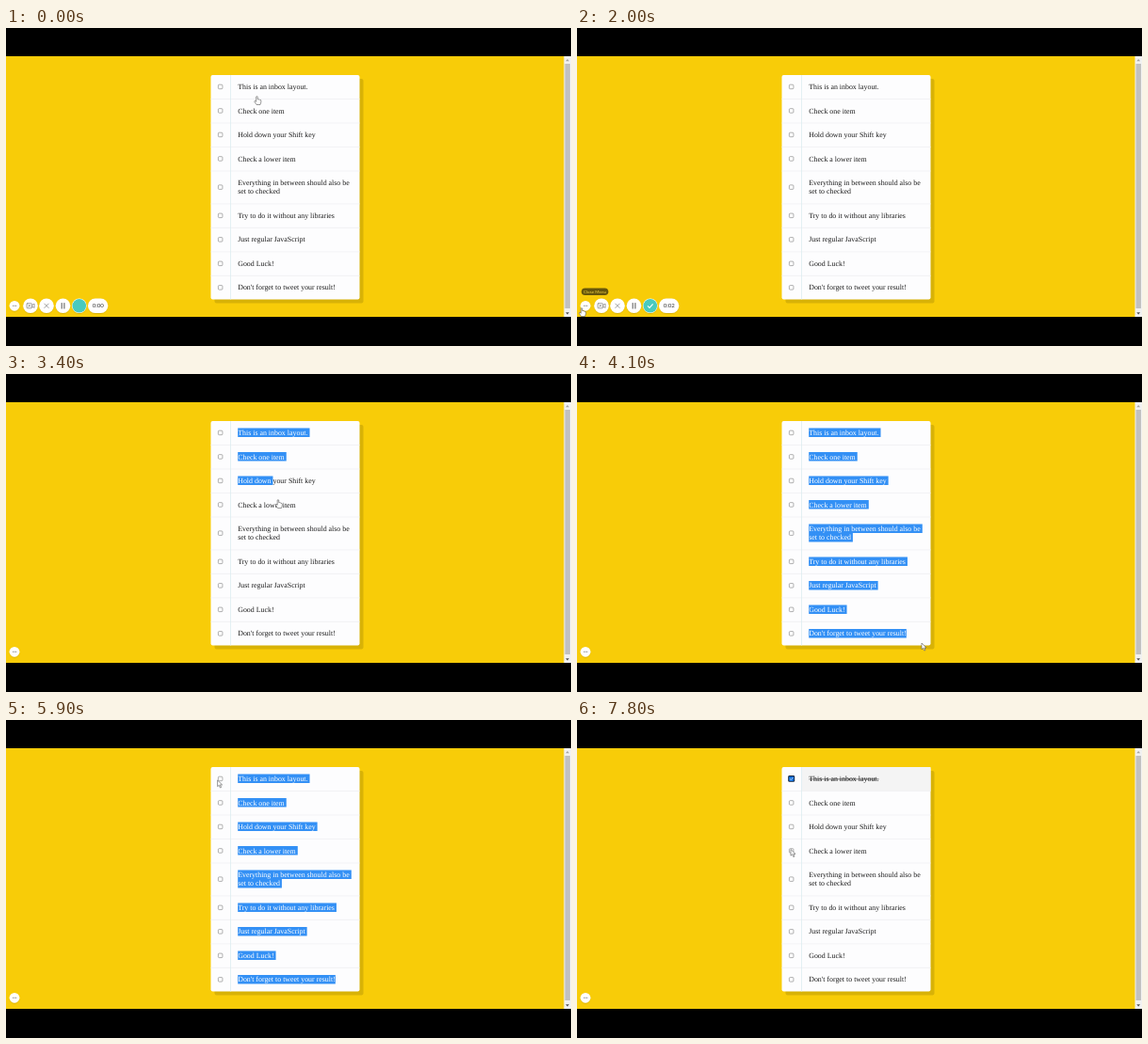
An HTML page for the animation above (8000 ms loop, 600 by 338 pixels).

```html
<!DOCTYPE html>
<html lang="en">
<head>
<meta charset="utf-8">
<title>Inbox checklist</title>
<style>
  html, body { margin: 0; width: 100%; height: 100%; overflow: hidden; background: #000; }
  svg { display: block; width: 100vw; height: 100vh; }
  .line { font: 7.9px "Liberation Serif", serif; text-rendering: geometricPrecision; white-space: pre; }
  .timer { font: 6.1px Lato, sans-serif; fill: #333; text-anchor: middle; }
  .tip { font: 4.6px Lato, sans-serif; fill: #f3d34c; text-anchor: middle; }
  .icon { fill: none; stroke: #8b8b8b; stroke-width: .8; stroke-linecap: round; stroke-linejoin: round; }
</style>
</head>
<body>
<svg id="stage" viewBox="0 0 600 338">
  <defs>
    <clipPath id="selection"></clipPath>
    <filter id="soft" x="-20%" y="-40%" width="140%" height="180%">
      <feDropShadow dx="0" dy=".5" stdDeviation=".7" flood-opacity=".25"/>
    </filter>
  </defs>
  <rect width="600" height="338"/>
  <rect y="30" width="600" height="277" fill="#f8cc08"/>

  <g id="scrollbar">
    <rect x="592.5" y="30" width="7.5" height="277" fill="#f1f1f1"/>
    <rect x="593.5" y="38" width="5.5" height="260" fill="#c1c1c1"/>
    <path d="M594.3 35.3h3.8l-1.9-2.2z" fill="#a3a3a3"/>
    <path d="M594.3 302.2h3.8l-1.9 2.2z" fill="#505050"/>
  </g>

  <rect x="221.5" y="54" width="158" height="238.5" rx="2" opacity=".13"/>
  <rect x="217.5" y="50" width="158" height="238.5" rx="2" fill="#fdfdfe"/>
  <rect id="checkedRow" x="238.8" y="50" width="136.7" height="25.2" fill="#f4f4f4"/>
  <g id="rules"></g>
  <path d="M238.5 50V288.5" stroke="#dcedf0" stroke-width=".8"/>
  <g id="boxes"></g>
  <g id="lines" fill="#1c1c1c"></g>
  <path id="strike" d="M246.3 62.9H320.5" stroke="#1c1c1c" stroke-width=".6"/>
  <g id="highlight" clip-path="url(#selection)">
    <rect x="240" y="50" width="136" height="240" fill="#3390f5"/>
    <g id="selectedLines" fill="#fff"></g>
  </g>
  <g id="tick">
    <rect id="ring" x="224.2" y="59" width="7" height="6.8" rx="1.4" fill="#10243c"/>
    <rect x="225.1" y="59.9" width="5.2" height="5" rx=".8" fill="#1270dc"/>
    <path d="M226.2 62.5l1.1 1.1 2-2.3" fill="none" stroke="#fff" stroke-width=".7"/>
  </g>

  <g id="toolbar" filter="url(#soft)">
    <g fill="#fff">
      <circle cx="26" cy="295.3" r="7.8"/>
      <circle cx="43" cy="295.3" r="7.8"/>
      <circle cx="60.5" cy="295.3" r="7.8"/>
      <circle cx="77.8" cy="295.3" r="7.8"/>
      <rect x="87" y="287.5" width="21.3" height="15.6" rx="7.8"/>
    </g>
    <circle cx="77.8" cy="295.3" r="7.3" fill="#49cabe"/>
    <g class="icon">
      <rect x="22" y="292.7" width="5.6" height="5.2" rx=".8"/>
      <path d="M27.6 294.6l2.5-1.4v4.2l-2.5-1.4M23.6 294.1l2.4 2.4m0-2.4l-2.4 2.4"/>
      <path d="M40.8 293.1l4.4 4.4m0-4.4l-4.4 4.4"/>
      <path d="M59.2 292.5v5.6m2.7-5.6v5.6" stroke="#555" stroke-width="1"/>
    </g>
    <path id="done" d="M75 295.4l2 2 3.6-4" fill="none" stroke="#fff" stroke-width="1.1"/>
    <text id="timer" class="timer" x="97.7" y="297.4"></text>
  </g>
  <g filter="url(#soft)">
    <circle cx="9" cy="295.3" r="5.4" fill="#fff"/>
    <path d="M7.1 295.3h4.2" stroke="#777" stroke-width="1.1" stroke-dasharray="1 .6"/>
  </g>
  <g id="tooltip">
    <rect x="4.7" y="276.5" width="28.6" height="7.6" rx="3.8" fill="#4d420c"/>
    <text class="tip" x="19" y="281.8">Close Menu</text>
  </g>

  <g id="cursor" fill="#fff" stroke="#555" stroke-width=".6" stroke-linejoin="round">
    <path id="arrow" d="M0 0V6.7L1.6 5.3 2.8 8 4 7.5 2.8 4.9H5z"/>
    <path id="hand" d="M-.8 .5Q0-.5 .7 .5V3.2Q1.5 2.7 2 3.5 2.8 3 3.2 3.9 4.1 3.5 4.3 4.5V6.4L3.5 9H-.5L-2.6 5.9Q-2.8 4.7-1.8 4.9L-.8 5.8z"/>
  </g>
</svg>
<script>
(() => {
  const LOOP = 8000, STEP = 100, LAG = 150;
  const LEFT = 246.2, SPACE = 2;
  const $ = id => document.getElementById(id);
  const clamp = v => Math.max(0, Math.min(1, v));
  const show = (id, on) => $(id).setAttribute('opacity', Number(on));

  function add(parent, tag, attrs, text = '') {
    const node = document.createElementNS('http://www.w3.org/2000/svg', tag);
    for (const key in attrs) node.setAttribute(key, attrs[key]);
    node.textContent = text;
    return parent.appendChild(node);
  }

  const items = [
    ['This is an inbox layout.'], ['Check one item'], ['Hold down your Shift key'],
    ['Check a lower item'], ['Everything in between should also be', 'set to checked'],
    ['Try to do it without any libraries'], ['Just regular JavaScript'],
    ['Good Luck!'], ["Don't forget to tweet your result!"]
  ];

  // Lay out rows from the top; a wrapped item is taller by one line.
  const lines = [];
  let rowTop = 50;
  items.forEach((texts, i) => {
    const height = 25.5 + (texts.length - 1) * 9.4;
    const middle = rowTop + height / 2 - .35;
    if (i) add($('rules'), 'path', { d: `M217.5 ${rowTop}H375.5`, stroke: '#f0f0f3', 'stroke-width': .8 });
    add($('boxes'), 'rect', {
      x: 225.4, y: middle - 2.2, width: 4.5, height: 4.5, rx: .9,
      fill: '#fff', stroke: '#858585', 'stroke-width': .65
    });
    texts.forEach((text, j) => {
      const center = middle + (j - (texts.length - 1) / 2) * 9.4;
      const attrs = { class: 'line', x: LEFT, y: center + 2.6 };
      const node = add($('lines'), 'text', attrs, text);
      add($('selectedLines'), 'text', attrs, text);
      const clip = add($('selection'), 'rect', { x: LEFT, y: center - 4.8, width: 0, height: 9.5 });
      lines.push({ center, node, clip, length: text.length });
    });
    rowTop += height;
  });

  // Cursor tip: time, x, y
  const path = [
    [0, 266.5, 72.5], [400, 300, 63], [900, 311, 92], [1200, 343, 110], [1500, 210, 215],
    [1800, 35, 286], [2000, 5, 297.5], [2250, 5, 297.5], [2600, 308, 92], [2900, 247, 59],
    [3250, 283.5, 114], [3400, 289, 133.5], [3700, 325, 220], [3900, 362, 283],
    [4100, 366, 286], [4500, 414, 272], [4900, 330, 185], [5300, 210, 76], [5500, 210, 76],
    [5900, 224.6, 64], [6300, 225, 64], [6600, 227.6, 62], [7050, 227.6, 62],
    [7600, 227, 137.5], [8000, 227, 137.5]
  ];

  function cursorAt(t) {
    const i = path.findIndex(p => p[0] > t);
    const [a, b] = [path[i - 1], path[i]];
    const k = (t - a[0]) / (b[0] - a[0]);
    return { x: a[1] + (b[1] - a[1]) * k, y: a[2] + (b[2] - a[2]) * k };
  }

  function selectTo(focus) {
    lines.forEach(({ center, node, clip, length }, i) => {
      const last = i === lines.length - 1;
      const start = i ? (lines[i - 1].center + center) / 2 : -Infinity;
      const end = last ? Infinity : (center + lines[i + 1].center) / 2;
      let width = 0;
      if (focus.y >= end) {
        width = node.getComputedTextLength() + SPACE;
      } else if (focus.y >= start) {
        for (let c = 1; c <= length; c++) {
          const w = node.getSubStringLength(0, c);
          if (LEFT + w <= focus.x + 1.5) width = w;
        }
      }
      clip.setAttribute('width', width);
    });
  }

  function draw(t) {
    const { x, y } = cursorAt(t);
    const overText = x > 239 && x < 375.5 && y > 50 && y < 284;
    const overBar = x < 108 && y > 286;
    const hand = overText || overBar;
    $('cursor').setAttribute('transform', `translate(${x} ${y})`);
    show('hand', hand);
    show('arrow', !hand);

    const folded = clamp((t - 2200) / 400);
    $('toolbar').setAttribute('transform', `translate(${-12 * folded} 0)`);
    show('toolbar', 1 - folded);
    show('done', t >= 300);
    $('timer').textContent = `0:0${Math.floor(t / 1000)}`;
    show('tooltip', .85 * clamp((t - 1800) / 200) * (1 - clamp((t - 2200) / 200)));

    const selecting = t >= 2950 && t < 6000;
    show('highlight', selecting);
    if (selecting) selectTo(cursorAt(Math.min(t - LAG, 3900)));

    const checked = t >= 6600;
    show('tick', checked);
    show('strike', checked);
    show('ring', t >= 6900);
    show('checkedRow', clamp((t - 6700) / 200));
  }

  function frame(now) {
    draw(Math.floor(now % LOOP / STEP) * STEP);
    requestAnimationFrame(frame);
  }
  draw(0);
  requestAnimationFrame(frame);
})();
</script>
</body>
</html>
```
